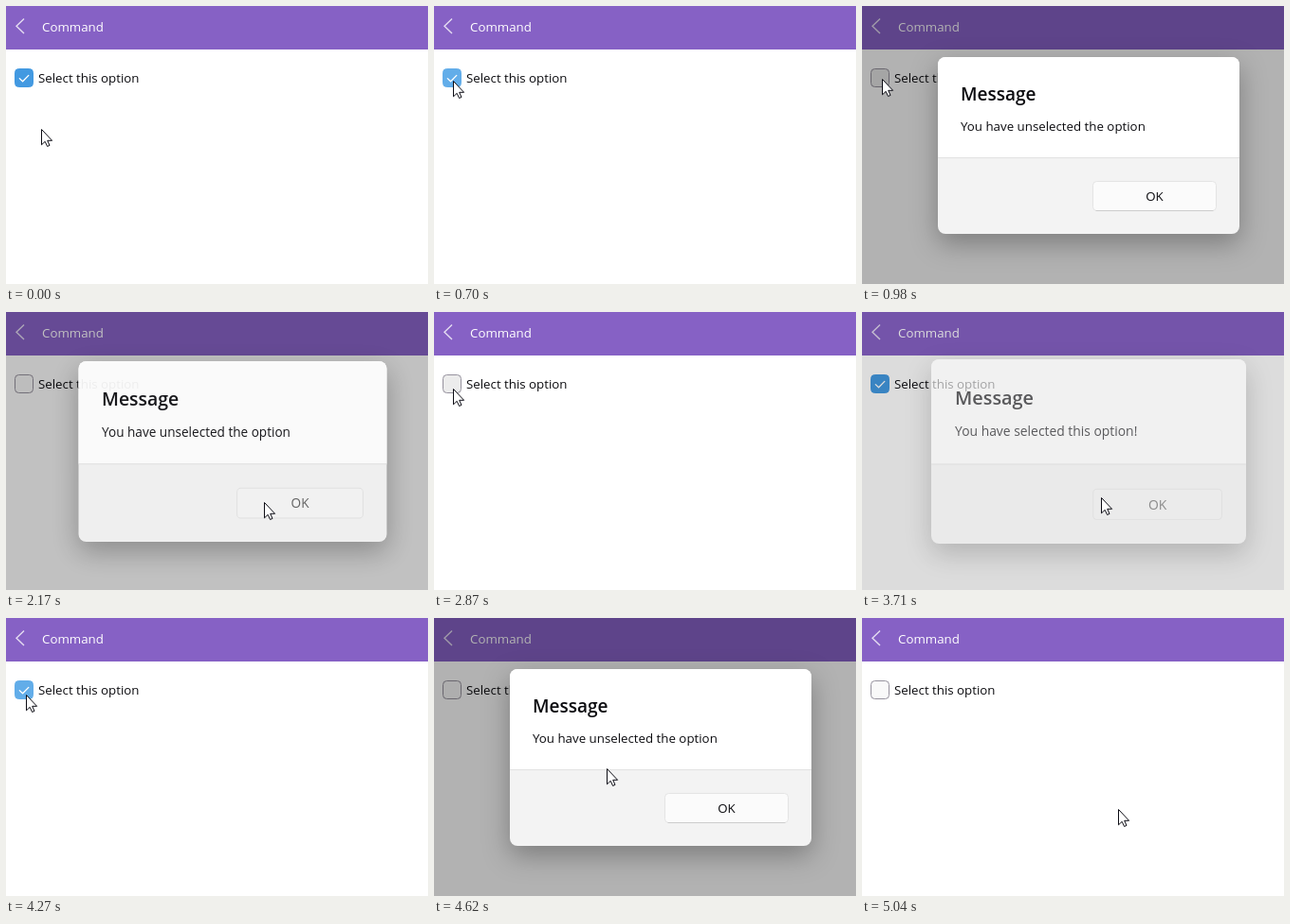
Recreate the animation shown at these times as an HTML page. Size 445 by 294 pixels, loop 5670 ms.

```html
<!DOCTYPE html>
<html lang="en">
<head>
<meta charset="utf-8">
<title>Checkbox command</title>
<style>
  html, body { margin: 0; width: 100%; height: 100%; overflow: hidden; background: #fff; }
  svg { display: block; width: 100vw; height: 100vh; }
  text { font: 13.3px "Open Sans", "Noto Sans", sans-serif; fill: #0c0c10; }
  #panel { filter: drop-shadow(0 10px 14px rgba(0, 0, 0, .3)); }
</style>
</head>
<body>
<svg viewBox="0 0 445 294">
  <rect width="445" height="294" fill="#fff"/>
  <rect width="445" height="46" fill="#8661c5"/>
  <path d="M19 13.5 11 21.2 19 29" fill="none" stroke="#e4dcf1" stroke-width="1.4"/>
  <text x="38" y="27" style="fill:#fff">Command</text>

  <rect id="box" x="9.5" y="66.5" width="19" height="19" rx="4"/>
  <path id="tick" d="M14.3 76.6 17.6 79.8 23.8 73.4" fill="none" stroke="#fff" stroke-width="1.3" stroke-linecap="round" stroke-linejoin="round"/>
  <text x="34" y="81">Select this option</text>

  <rect id="scrim" width="445" height="294"/>
  <g id="dialog">
    <g id="panel">
      <rect x="80" y="54" width="318" height="187" rx="8" fill="#f3f3f3"/>
      <path d="M80 160V62a8 8 0 0 1 8-8H390a8 8 0 0 1 8 8V160Z" fill="#fff"/>
    </g>
    <path d="M80 160.5H398" stroke="#e2e2e2"/>
    <text x="104" y="100" style="font-size:19px;font-weight:600">Message</text>
    <text id="note" x="104" y="132"></text>
    <rect id="button" x="243.5" y="185.5" width="130" height="31" rx="4" stroke="#e4e4e4"/>
    <path id="edge" d="M246.5 216.5H370.5" stroke="#cccccc"/>
    <text id="ok" x="308.5" y="206" text-anchor="middle">OK</text>
  </g>

  <path id="cursor" d="M.5 .5V16.8L4.2 13.3 6.6 18.5 9 17.4 6.7 12.3H11.6Z" fill="#fff" stroke="#0c0c14" stroke-linejoin="round"/>
</svg>
<script>
  const LOOP = 5670, STEP = 70;
  const $ = id => document.getElementById(id);
  const set = (id, attrs) => {
    for (const name in attrs) $(id).setAttribute(name, attrs[name]);
  };

  const smooth = p => p * p * (3 - 2 * p);
  const easeIn = p => p ** 1.5;
  const easeOut = p => 1 - (1 - p) ** 2;
  const linear = p => p;

  // Pointer stops: time, x, y, easing on the way there
  const stops = [
    [0, 37, 130], [630, 17, 86, smooth], [770, 21, 77, easeOut],
    [1050, 21, 77], [1680, 208, 184, easeIn], [1890, 272, 201, easeOut],
    [2310, 272, 201], [2800, 42, 92, smooth], [2870, 20, 81, linear],
    [2940, 20, 81], [3430, 262, 201, smooth],
    [3640, 262, 201], [4200, 21, 81, smooth],
    [4410, 21, 81], [4760, 270, 202, smooth], [LOOP, 270, 202]
  ];

  const unselected = "You have unselected the option";
  const selected = "You have selected this option!";
  const modals = [
    { open: 770, full: 980, press: 2030, close: 2100, gone: 2310, note: unselected },
    { open: 2870, full: 2940, press: 3500, close: 3570, gone: 3780, note: selected },
    { open: 4340, full: 4550, press: 4830, close: 5040, gone: 5040, note: unselected }
  ];

  function pointer(t) {
    const i = stops.findIndex(s => s[0] > t);
    const [t0, x0, y0] = stops[i - 1];
    const [t1, x1, y1, ease = linear] = stops[i];
    const p = ease((t - t0) / (t1 - t0));
    return [x0 + (x1 - x0) * p, y0 + (y1 - y0) * p];
  }

  const inside = (x, y, l, t, r, b) => x >= l && x < r && y >= t && y < b;

  function drawBox(t, x, y) {
    const checked = t < 770 || (t >= 2940 && t < 4340);
    const hover = inside(x, y, 9, 66, 29, 86) || (t >= 980 && t < 1750);
    const blue = hover ? "#62ade9" : "#4299e1";
    set("box", {
      fill: checked ? blue : hover ? "#ececec" : "#f9f9f9",
      stroke: checked ? blue : "#96929e"
    });
    set("tick", { opacity: checked ? 1 : 0 });
  }

  function drawDialog(t, x, y) {
    const m = modals.find(d => t > d.open && t < d.gone);
    set("dialog", { visibility: m ? "visible" : "hidden" });
    if (!m) return set("scrim", { opacity: 0 });

    const grow = Math.min(1, (t - m.open) / (m.full - m.open));
    const fade = t < m.close ? 0 : (t - m.close) / (m.gone - m.close);
    const scale = 1 + .05 * (1 - grow) ** 3 + .066 * fade;
    set("scrim", { opacity: .3 * grow * (1 - fade ** 1.5) });
    set("dialog", {
      opacity: Math.min(1, grow * 1.5) * (1 - fade ** 2.4),
      transform: `translate(239 147.5) scale(${scale}) translate(-239 -147.5)`
    });
    $("note").textContent = m.note;

    const pressed = t >= m.press;
    const hover = inside(x, y, 243, 185, 374, 217);
    set("button", { fill: pressed ? "#f5f5f5" : hover ? "#f7f7f7" : "#fbfbfb" });
    set("edge", { opacity: pressed ? 0 : 1 });
    $("ok").style.fill = pressed ? "#5c5c5c" : "#0c0c10";
  }

  function draw(t) {
    const [x, y] = pointer(t);
    drawBox(t, x, y);
    drawDialog(t, x, y);
    set("cursor", { transform: `translate(${Math.round(x)} ${Math.round(y)})` });
  }

  const start = performance.now();
  function tick(now) {
    const t = Math.max(0, now - start) % LOOP;
    draw(Math.floor(t / STEP) * STEP);
    requestAnimationFrame(tick);
  }
  draw(0);
  requestAnimationFrame(tick);
</script>
</body>
</html>
```
